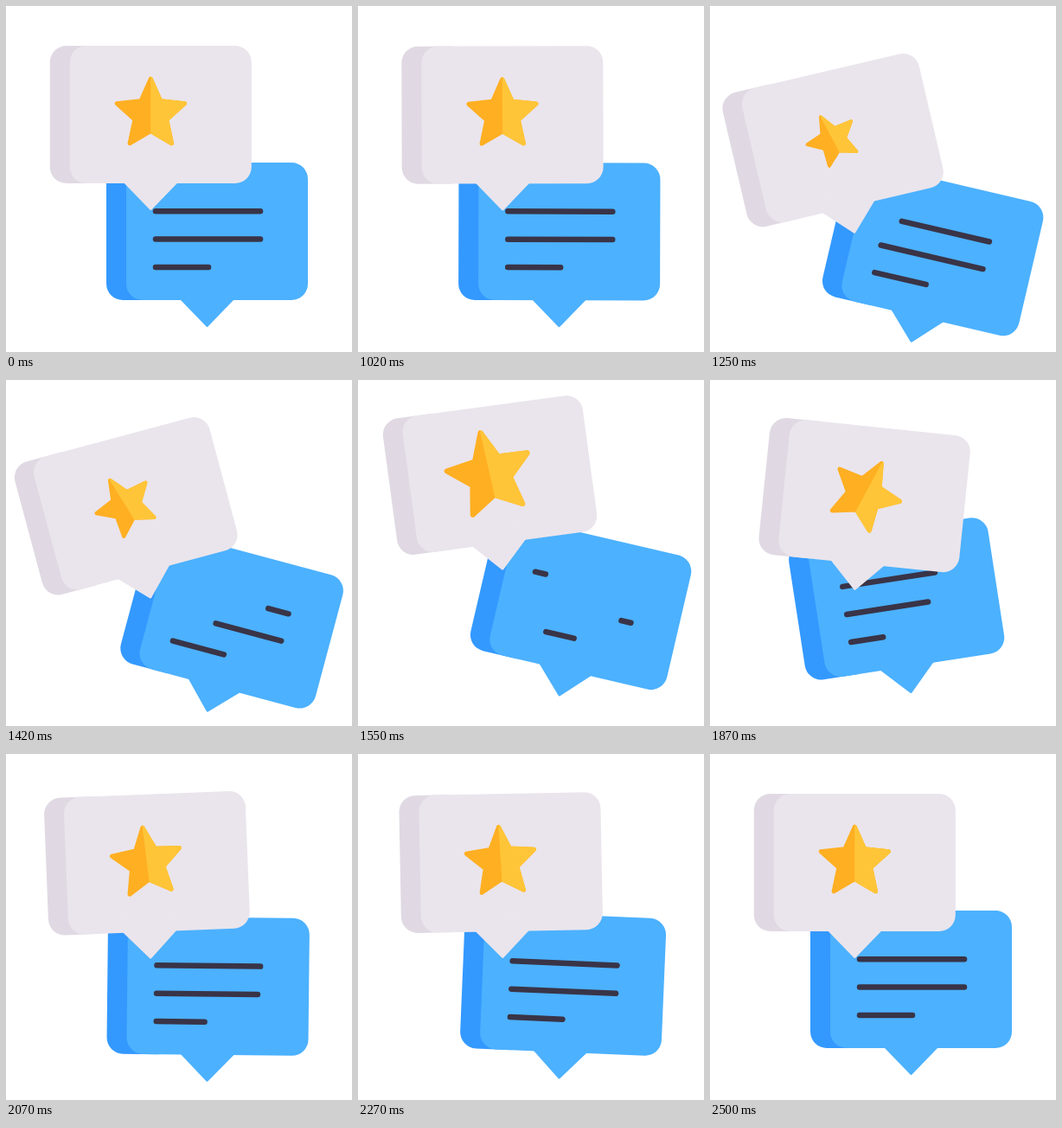
Animation, 400 px wide and 400 px high, one loop 2520 ms. Source, as an HTML page with a canvas:

```html
<!DOCTYPE html>
<html lang="en">
<head>
<meta charset="utf-8">
<title>Chat bubbles</title>
<style>
  html, body { margin: 0; width: 100%; height: 100%; overflow: hidden; background: #fff; }
  canvas { display: block; width: 100%; height: 100%; }
</style>
</head>
<body>
<canvas id="stage" width="400" height="400"></canvas>
<script>
const ctx = document.getElementById('stage').getContext('2d');
const LOOP = 2520;
const START = 1000;
const RAD = Math.PI / 180;

const easeInOut = u => (1 - Math.cos(Math.PI * u)) / 2;
const easeOut = u => 1 - (1 - u) ** 4;
const progress = (t, from, span) => Math.min(1, Math.max(0, (t - from) / span));

// Winds up to the first peak, holds it until release, then swings
// through the other peaks and back to rest in equal half-swings.
function swing({ rise = 325, release, half, peaks }) {
  return t => {
    let value = peaks[0] * easeInOut(progress(t, START, rise));
    peaks.forEach((peak, i) => {
      const next = peaks[i + 1] || 0;
      value += (next - peak) * easeInOut(progress(t, release + i * half, half));
    });
    return value;
  };
}

// Each bubble swings around the tip of its tail.
const review = {
  x: 167.3, y: 236, front: '#eae5ec', side: '#e0d9e3',
  angle: swing({ release: 1425, half: 335, peaks: [-15, 8.6, -2.4] }),
  drop: swing({ rise: 270, release: 1340, half: 260, peaks: [27, -20.5, 7] })
};
const message = {
  x: 232.5, y: 371, front: '#4cb1fe', side: '#3399ff',
  angle: swing({ release: 1490, half: 340, peaks: [15, -9.2, 3] }),
  drop: swing({ rise: 270, release: 1325, half: 385, peaks: [18, -19, 8] })
};
const starTurn = swing({ release: 1440, half: 330, peaks: [-17, 30, -5.5] });
const starGrowth = swing({ release: 1320, half: 290, peaks: [-0.3, 0.27] });

function drawBubble(bubble, t, drawContent) {
  ctx.save();
  ctx.translate(bubble.x, bubble.y + bubble.drop(t));
  ctx.rotate(bubble.angle(t) * RAD);
  ctx.fillStyle = bubble.side;
  ctx.beginPath();
  ctx.roundRect(-116.5, -190, 60, 159, [19, 0, 0, 19]);
  ctx.fill();
  ctx.fillStyle = bubble.front;
  ctx.beginPath();
  ctx.roundRect(-93.5, -190, 210, 159, 19);
  ctx.fill();
  ctx.beginPath();
  ctx.moveTo(-31, -50);
  ctx.lineTo(31, -50);
  ctx.lineTo(31, -31.5);
  ctx.lineTo(1, -0.5);
  ctx.quadraticCurveTo(0, 0.5, -1, -0.5);
  ctx.lineTo(-31, -31.5);
  ctx.fill();
  drawContent(t);
  ctx.restore();
}

function starPath() {
  const path = new Path2D();
  for (let i = 0; i < 10; i++) {
    const radius = i % 2 ? 19.3 : 41.2;
    const angle = i * 36 * RAD;
    path.lineTo(radius * Math.sin(angle), -radius * Math.cos(angle));
  }
  path.closePath();
  return path;
}
const star = starPath();

function paintStar(color) {
  ctx.fillStyle = ctx.strokeStyle = color;
  ctx.fill(star);
  ctx.stroke(star);
}

function drawStar(t) {
  const scale = 1 + starGrowth(t);
  ctx.translate(0, -110.6);
  ctx.rotate(starTurn(t) * RAD);
  ctx.scale(scale, scale);
  ctx.lineWidth = 5;
  ctx.lineJoin = 'round';
  paintStar('#ffaf22');
  ctx.beginPath();
  ctx.rect(0, -60, 60, 120);
  ctx.clip();
  paintStar('#ffc538');
}

// Each line wipes away to the right, then is written again from the left.
function drawLines(t) {
  const left = -59.5;
  ctx.strokeStyle = '#393447';
  ctx.lineWidth = 6.5;
  ctx.lineCap = 'round';
  for (let i = 0; i < 3; i++) {
    const y = -133.8 + 32.4 * i;
    const length = i < 2 ? 121 : 61;
    const erase = 1160 + 128 * i;
    const redraw = 1530 + 86 * i;
    const from = t < redraw ? easeInOut(progress(t, erase, redraw - erase)) : 0;
    const to = t < redraw ? 1 : easeOut(progress(t, redraw, 800));
    ctx.beginPath();
    ctx.moveTo(left + length * from - 0.01, y);
    ctx.lineTo(left + length * to, y);
    ctx.stroke();
  }
}

function frame() {
  const t = performance.now() % LOOP;
  ctx.fillStyle = '#fff';
  ctx.fillRect(0, 0, 400, 400);
  drawBubble(message, t, drawLines);
  drawBubble(review, t, drawStar);
  requestAnimationFrame(frame);
}
frame();
</script>
</body>
</html>
```
